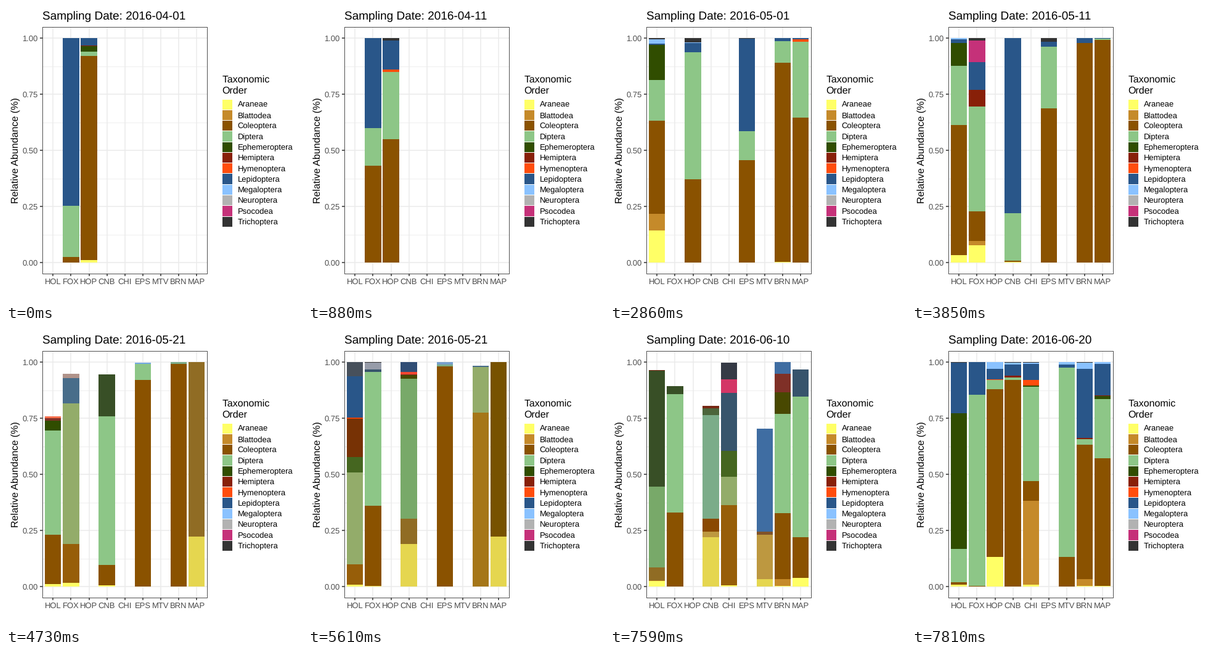
Recreate the animation shown at these times as a matplotlib script. Size 480 by 480 pixels, loop 8 s.

```python
import numpy as np
import matplotlib.pyplot as plt
from matplotlib.animation import FuncAnimation
from matplotlib.collections import LineCollection, PolyCollection

plt.rcParams["font.family"] = "Liberation Sans"
plt.rcParams["text.hinting"] = "none"
plt.rcParams["text.hinting_factor"] = 1

SIZE, DPI = 480, 72
LOOP, STEP = 8000, 20
FIRST, PERIOD, TICK = 660, 990, 110

ORDERS = {
    "A": ("Araneae", "#FFFF66"),
    "B": ("Blattodea", "#C58A2A"),
    "C": ("Coleoptera", "#8A5200"),
    "D": ("Diptera", "#8DC687"),
    "E": ("Ephemeroptera", "#304D00"),
    "H": ("Hemiptera", "#882008"),
    "Y": ("Hymenoptera", "#FF4D0D"),
    "L": ("Lepidoptera", "#295689"),
    "M": ("Megaloptera", "#8AC2FF"),
    "N": ("Neuroptera", "#B2B2B2"),
    "P": ("Psocodea", "#C53179"),
    "T": ("Trichoptera", "#333333"),
}
SITES = "HOL FOX HOP CNB CHI EPS MTV BRN MAP".split()

# Per date and site: order letter followed by the upper edge of its segment.
SAMPLES = [
    ("2016-04-01", {
        "FOX": "C.025 D.253 L1",
        "HOP": "A.012 C.92 D.94 E.964 H.968 L1"}),
    ("2016-04-11", {
        "FOX": "C.43 D.6 L1",
        "HOP": "C.55 D.85 Y.86 L.99 T1"}),
    ("2016-04-21", {
        "FOX": "C.835 D.957 E.962 L1",
        "HOP": "C.181 D.875 Y.882 L.99 M.995 T1",
        "EPS": "C.714 D.717 L1",
        "BRN": "C.042 D.244 H.255 L1",
        "MAP": "C.042 D.59 H.594 L1"}),
    ("2016-05-01", {
        "HOL": "A.143 B.217 C.632 D.813 E.97 L.976 M.995 T1",
        "HOP": "C.37 D.936 L.978 M.981 T1",
        "EPS": "C.456 D.585 L.998 T1",
        "BRN": "A.002 C.89 D.986 L1",
        "MAP": "C.646 D.984 Y.995 L1"}),
    ("2016-05-11", {
        "HOL": "A.033 C.613 D.876 E.979 L.994 M1",
        "FOX": "A.077 B.096 C.228 D.695 H.768 Y.77 L.892 P.989 T1",
        "CNB": "A.003 C.008 D.22 L1",
        "EPS": "C.687 D.962 L.984 T1",
        "BRN": "C.978 L1",
        "MAP": "C.992 D.996 L1"}),
    ("2016-05-21", {
        "HOL": "A.003 C.12 D.642 E.669 H.682 Y.688 L.92 T1",
        "FOX": "A.0005 C.217 D.984 L.994 N.9975 T1",
        "CNB": "A.005 C.122 D.913 E.93 H.932 Y.943 L1",
        "EPS": "C.9877 D.9995 M1",
        "BRN": "C.9955 D.9986 L1",
        "MAP": "A.003 C1"}),
    ("2016-05-31", {
        "HOL": "A.03 B.031 C.038 D.256 E.976 H.981 L.9976 M1",
        "FOX": "B.013 C.858 D.861 E.872 L.999 T1",
        "CNB": "C.838 D.937 E.975 H.989 L.992 P.998 T1",
        "CHI": "A.005 C.27 D.54 E.562 L.875 P.945 T1",
        "EPS": "C.953 L.957 T1",
        "MTV": "A.005 C.5536 D.557 L.6354 T1",
        "BRN": "A.003 C.906 D.9237 E.954 Y.9957 L1",
        "MAP": "C.988 E1"}),
    ("2016-06-10", {
        "HOL": "A.03 B.031 C.06 D.35 E.95 H.955 L.995 T1",
        "FOX": "C.423 D.858 E.862 H.867 L.999 T1",
        "CNB": "A.02 B.05 C.12 D.7 E.735 H.7495 Y.7525 L1",
        "CHI": "A.005 C.3555 D.495 E.5215 L.8525 P.9225 T1",
        "EPS": "C.93 L.94 T1",
        "MTV": "A.005 B.02 C.03 L.62 T1",
        "BRN": "A.002 B.033 C.241 D.8 E.925 H.943 L1",
        "MAP": "A.05 C.12 D.85 L1"}),
    ("2016-06-20", {
        "HOL": "A.008 C.02 D.168 E.772 L.998 T1",
        "FOX": "C.002 D.854 L1",
        "HOP": "A.132 C.88 D.92 Y.924 L.97 M1",
        "CNB": "C.92 D.93 H.94 L.988 M.996 T1",
        "CHI": "A.009 B.383 C.47 D.89 E.896 Y.92 L.992 M.997 T1",
        "MTV": "C.132 D.974 L.99 M1",
        "BRN": "A.002 B.033 C.632 D.656 H.662 L.97 M.997 T1",
        "MAP": "A.002 C.571 D.835 E.85 H.853 L.993 M1"}),
]

# Colours are blended in CIE Lab.
TO_XYZ = np.array([[.4124, .3576, .1805], [.2126, .7152, .0722],
                   [.0193, .1192, .9505]])
TO_RGB = np.linalg.inv(TO_XYZ)
WHITE = TO_XYZ.sum(axis=1)
TO_LAB = np.array([[0, 116, 0], [500, -500, 0], [0, 200, -200]])
FROM_LAB = np.array([[1, 500, 0], [1, 0, 0], [1, 0, -200]], float)
FROM_LAB = np.array([[1 / 116, 1 / 500, 0], [1 / 116, 0, 0],
                     [1 / 116, 0, -1 / 200]])


def to_lab(color):
    rgb = np.array([int(color[i:i + 2], 16) for i in (1, 3, 5)]) / 255
    lin = np.where(rgb > .04045, ((rgb + .055) / 1.055) ** 2.4, rgb / 12.92)
    v = TO_XYZ @ lin / WHITE
    f = np.where(v > .008856, np.cbrt(v), 7.787 * v + 16 / 116)
    return TO_LAB @ f - [16, 0, 0]


def to_rgb(lab):
    f = FROM_LAB @ (lab + [16, 0, 0])
    v = np.where(f > .2069, f ** 3, (f - 16 / 116) / 7.787)
    lin = np.clip(TO_RGB @ (v * WHITE), 0, 1)
    rgb = np.where(lin > .0031308, 1.055 * lin ** (1 / 2.4) - .055, 12.92 * lin)
    return np.clip(rgb, 0, 1)


LAB = {key: to_lab(color) for key, (_, color) in ORDERS.items()}

LEFT, RIGHT, TOP, BOTTOM = 59, 326.2, 33.9, 434.1
UNIT = (RIGHT - LEFT) / 9.2
CENTERS = [LEFT + UNIT * (i + .6) for i in range(len(SITES))]


def level(p):
    return 416 - 364 * p


def rect(x0, y0, x1, y1):
    return [(x0, y0), (x1, y0), (x1, y1), (x0, y1)]


def segments(text):
    low, out = 0, []
    for part in text.split():
        high = float(part[1:])
        out.append((part[0], low, high))
        low = high
    return out


DATA = [{site: segments(s) for site, s in bars.items()} for _, bars in SAMPLES]


def stacks(a, b, t):
    """Bars between two dates; segments pair up by rank within a site."""
    polys, colors = [], []
    for site, x in zip(SITES, CENTERS):
        old, new = DATA[a].get(site, []), DATA[b].get(site, [])
        if t == 1:
            old = new
        for (k0, lo0, hi0), (k1, lo1, hi1) in zip(old, new):
            lo, hi = lo0 + (lo1 - lo0) * t, hi0 + (hi1 - hi0) * t
            polys.append(rect(x - .45 * UNIT, level(hi), x + .45 * UNIT, level(lo)))
            colors.append(to_rgb(LAB[k0] + (LAB[k1] - LAB[k0]) * t))
    return polys, colors


def quad_in_out(t):
    return 2 * t * t if t < .5 else 1 - 2 * (1 - t) ** 2


fig = plt.figure(figsize=(SIZE / DPI, SIZE / DPI), dpi=DPI, facecolor="white")
ax = fig.add_axes([0, 0, 1, 1])
ax.set_xlim(0, SIZE)
ax.set_ylim(SIZE, 0)
ax.axis("off")


def lines(segs, color, width, z):
    ax.add_collection(LineCollection(segs, colors=color, linewidths=width,
                                     capstyle="butt", zorder=z))


def label(x, y, text, size, color="black", **kw):
    return ax.text(x, y, text, fontsize=size, color=color, va="baseline", **kw)


quarters = np.arange(5) / 4
lines([[(LEFT, level(q)), (RIGHT, level(q))] for q in quarters[:4] + .125],
      "#EBEBEB", .78, 1)
lines([[(LEFT, level(q)), (RIGHT, level(q))] for q in quarters]
      + [[(x, TOP), (x, BOTTOM)] for x in CENTERS], "#EBEBEB", 1.55, 1)
lines([[(LEFT - 4, level(q)), (LEFT, level(q))] for q in quarters]
      + [[(x, BOTTOM), (x, BOTTOM + 4)] for x in CENTERS], "#333333", 1.55, 3)
border = rect(LEFT + .4, TOP + .4, RIGHT - .4, BOTTOM - .4)
lines([border + border[:1]], "#333333", .85, 4)

for q in quarters:
    label(51.8, level(q) + 4.6, f"{q:.2f}", 12.8, "#4D4D4D", ha="right")
for site, x in zip(SITES, CENTERS):
    label(x, 451.2, site, 12.8, "#4D4D4D", ha="center")
ax.text(19.4, 234, "Relative Abundance (%)", fontsize=16, rotation=90,
        rotation_mode="anchor", ha="center", va="baseline")

label(350.4, 124.3, "Taxonomic", 16)
label(350.4, 141.4, "Order", 16)
keys = []
for i, (name, _) in enumerate(ORDERS.values()):
    y = 151 + 17.28 * i
    keys.append(rect(350.9, y + .5, 367.2, y + 16.8))
    label(375.8, y + 13.2, name, 12.8)
ax.add_collection(PolyCollection(keys, linewidths=0,
                                 facecolors=[c for _, c in ORDERS.values()]))

title = label(58.6, 22, "", 19.2)
bars = PolyCollection([], linewidths=0, zorder=2)
ax.add_collection(bars)


def moment(ms):
    """Return (from, to, eased progress, titled date) at a time."""
    if ms < FIRST:
        return 0, 0, 1, 0
    a, rest = divmod(ms - FIRST, PERIOD)
    step = min(rest // TICK + 1, 3)
    t = quad_in_out(step / 3) if step < 3 else 1
    return a, a + 1, t, a + (step > 1)


def draw(i):
    a, b, t, named = moment(i * STEP + STEP // 2)
    polys, colors = stacks(a, b, t)
    bars.set_verts(polys)
    bars.set_facecolor(colors)
    title.set_text("Sampling Date: " + SAMPLES[named][0])
    return bars, title


anim = FuncAnimation(fig, draw, frames=LOOP // STEP, interval=STEP,
                     repeat=True, repeat_delay=0, blit=False)
plt.show()
```
